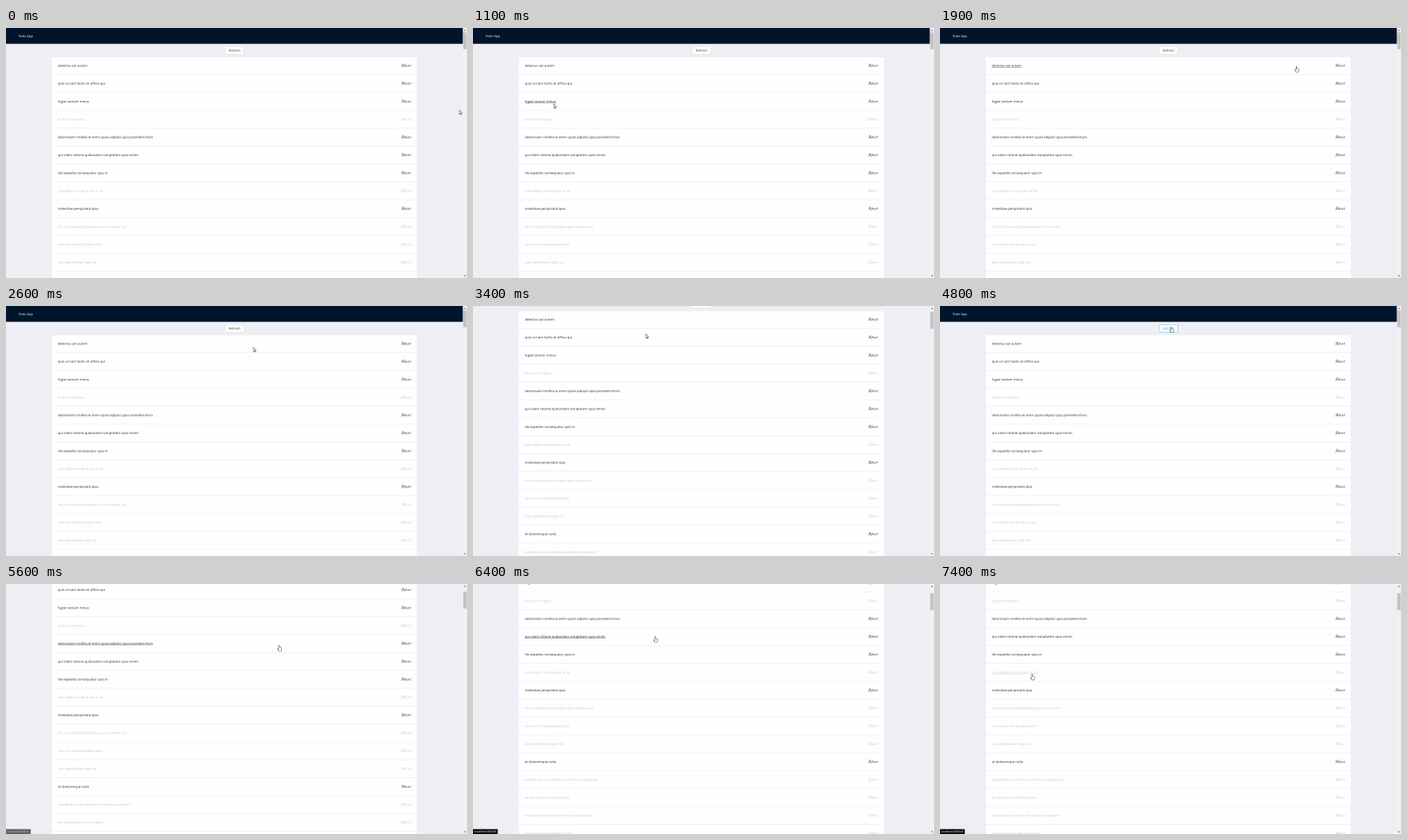
An HTML page with a canvas for the animation above (8000 ms loop, 600 px wide and 326 px high).

```html
<!DOCTYPE html>
<html lang="en">
<head>
<meta charset="utf-8">
<title>Todo App</title>
<style>
  html, body { margin: 0; width: 100%; height: 100%; overflow: hidden; background: #eeeff4; }
  canvas { display: block; width: 600px; height: 326px; }
</style>
</head>
<body>
<canvas id="stage"></canvas>
<script>
const W = 600, H = 326, LOOP = 8000, STEP = 100;
const PITCH = 23.32, FIRST = 49, NOTCH = 32.35;
const SHARP = 4; // the page is drawn this much larger, then smoothed down

const stage = document.getElementById('stage');
const page = document.createElement('canvas');
const dpr = window.devicePixelRatio || 1;
function sized(canvas, scale) {
  canvas.width = W * scale;
  canvas.height = H * scale;
  return canvas.getContext('2d');
}
const out = sized(stage, dpr);
const ctx = sized(page, dpr * SHARP);
out.imageSmoothingQuality = 'high';
ctx.scale(dpr * SHARP, dpr * SHARP);

// A leading "*" marks a finished task.
const todos = [
  'delectus aut autem',
  'quis ut nam facilis et officia qui',
  'fugiat veniam minus',
  '*et porro tempora',
  'laboriosam mollitia et enim quasi adipisci quia provident illum',
  'qui ullam ratione quibusdam voluptatem quia omnis',
  'illo expedita consequatur quia in',
  '*quo adipisci enim quam ut ab',
  'molestiae perspiciatis ipsa',
  '*illo est ratione doloremque quia maiores aut',
  '*vero rerum temporibus dolor',
  '*ipsa repellendus fugit nisi',
  'et doloremque nulla',
  '*repellendus sunt dolores architecto voluptatum',
  '*ab voluptatum amet voluptas',
  '*accusamus eos facilis sint et aut voluptatem',
  '*quo laboriosam deleniti aut qui',
  'dolorum est consequatur ea mollitia in culpa'
];

const ramp = (t, start, length) => Math.min(1, Math.max(0, (t - start) / length));
const smooth = f => f * f * (3 - 2 * f);
const easeOut = f => 1 - (1 - f) ** 3;

// Each glide: start, length, end point.
const glides = [
  [100, 900, 105, 99], [1100, 700, 464, 50], [1900, 700, 322, 54],
  [2900, 500, 225, 36.5], [3400, 800, 301, 27.3], [4800, 700, 355.5, 80],
  [5700, 800, 232, 68], [6700, 700, 120, 117.6]
];

function pointerAt(t) {
  let x = 590, y = 107;
  for (const [start, length, toX, toY] of glides) {
    const f = smooth(ramp(t, start, length));
    x += (toX - x) * f;
    y += (toY - y) * f;
  }
  return [x, y];
}

function scrollAt(t) {
  const turn = start => NOTCH * easeOut(ramp(t, start, 500));
  return turn(3050) - turn(3400) + turn(4820) + turn(5080) + turn(5690);
}

function box(x, y, w, h, fill, radius = 0, stroke) {
  ctx.beginPath();
  ctx.roundRect(x, y, w, h, radius);
  ctx.fillStyle = fill;
  ctx.fill();
  if (stroke) {
    ctx.strokeStyle = stroke;
    ctx.lineWidth = 0.4;
    ctx.stroke();
  }
}

// Set at ten times the size and scaled down so that glyph spacing stays exact.
function text(str, x, y, color, size = 4.28) {
  ctx.save();
  ctx.translate(x, y);
  ctx.scale(0.1, 0.1);
  ctx.font = `${size * 10}px "Open Sans", "Noto Sans", sans-serif`;
  ctx.fillStyle = color;
  ctx.fillText(str, 0, 0);
  const width = ctx.measureText(str).width / 10;
  ctx.restore();
  return width;
}

function userIcon(x, y) {
  ctx.strokeStyle = '#222';
  ctx.lineWidth = 0.45;
  ctx.beginPath();
  ctx.arc(x, y - 0.9, 1.1, 0, 7);
  ctx.moveTo(x - 1.8, y + 2);
  ctx.arc(x, y + 2, 1.8, Math.PI, 0);
  ctx.stroke();
}

function drawRow(title, y, hovered) {
  const done = title[0] === '*';
  ctx.globalAlpha = done ? 0.25 : 1;
  const width = text(title.replace('*', ''), 67.5, y + 1.5, '#222');
  if (hovered) box(67.5, y + 2.1, width, 0.35, '#222');
  userIcon(516.8, y);
  text('Kurt', 518.9, y + 1.5, '#222');
  ctx.globalAlpha = 1;
  box(59.7, y + 11.3, 475, 0.8, '#eeeff2');
}

function arrow(y, dir) {
  ctx.fillStyle = '#505050';
  ctx.fill(new Path2D(`M595.9 ${y}h2.8l-1.4 ${dir * 1.5}z`));
}

function drawScrollbar(scroll) {
  box(594.6, 0, 5.4, H, '#f1f1f1');
  box(595.2, 5.6 + scroll * 0.067, 4.3, 22, '#c1c1c1');
  arrow(3.6, -1);
  arrow(322.6, 1);
}

const ARROW = new Path2D('M0 0V5.3L1.2 4.3 2 6.2 2.8 5.8 2 4 3.6 3.8Z');
const HAND = new Path2D('M-.6.5Q0-.4.6.5V2.6L2.6 3Q3.4 3.4 3.1 5.6L2.4 7.4H-.6L-2.2 4.9Q-2 4-.6 5Z');

function drawPointer(x, y, shape) {
  ctx.save();
  ctx.translate(x, y);
  ctx.fillStyle = '#fff';
  ctx.strokeStyle = '#222';
  ctx.lineWidth = 0.45;
  ctx.fill(shape);
  ctx.stroke(shape);
  ctx.restore();
}

function draw(t) {
  const [px, py] = pointerAt(t);
  const scroll = scrollAt(t);
  const rowY = i => FIRST + i * PITCH - scroll;
  const near = Math.max(0, Math.round((py - rowY(0)) / PITCH));
  const gap = px > 67 && px < 512 ? Math.abs(py - rowY(near)) : Infinity;
  const onButton = px > 285 && px < 309.5 && py > 24 - scroll && py < 34.2 - scroll;

  box(0, 0, W, H, '#eeeff4');
  box(0, -scroll, 594.6, 20.6, '#001529');
  text('Todo App', 16.2, 11.9 - scroll, '#fff');

  const accent = onButton && '#40a9ff';
  box(285.2, 24.2 - scroll, 24.2, 9.9, '#fff', 0.7, accent || '#d9d9d9');
  text('Refresh', 289.8, 30.7 - scroll, accent || '#333');

  box(59.7, 38.1 - scroll, 475, 500, '#fefefe', 1);
  todos.forEach((title, i) => drawRow(title, rowY(i), i === near && gap < 3.6));

  drawScrollbar(scroll);
  ctx.globalAlpha = ramp(t, 5440, 260);
  box(0, 319.6, 32.2, 6.4, '#080808');
  text(`localhost:3000/${near + 1}`, 1.5, 324.1, '#fff', 3.72);
  ctx.globalAlpha = 1;
  drawPointer(px, py, onButton || gap < 3 ? HAND : ARROW);

  out.drawImage(page, 0, 0, stage.width, stage.height);
}

let shown = -1;
function tick() {
  const t = Math.floor(performance.now() % LOOP / STEP) * STEP;
  if (t !== shown) draw(shown = t);
  requestAnimationFrame(tick);
}
tick();
</script>
</body>
</html>
```
